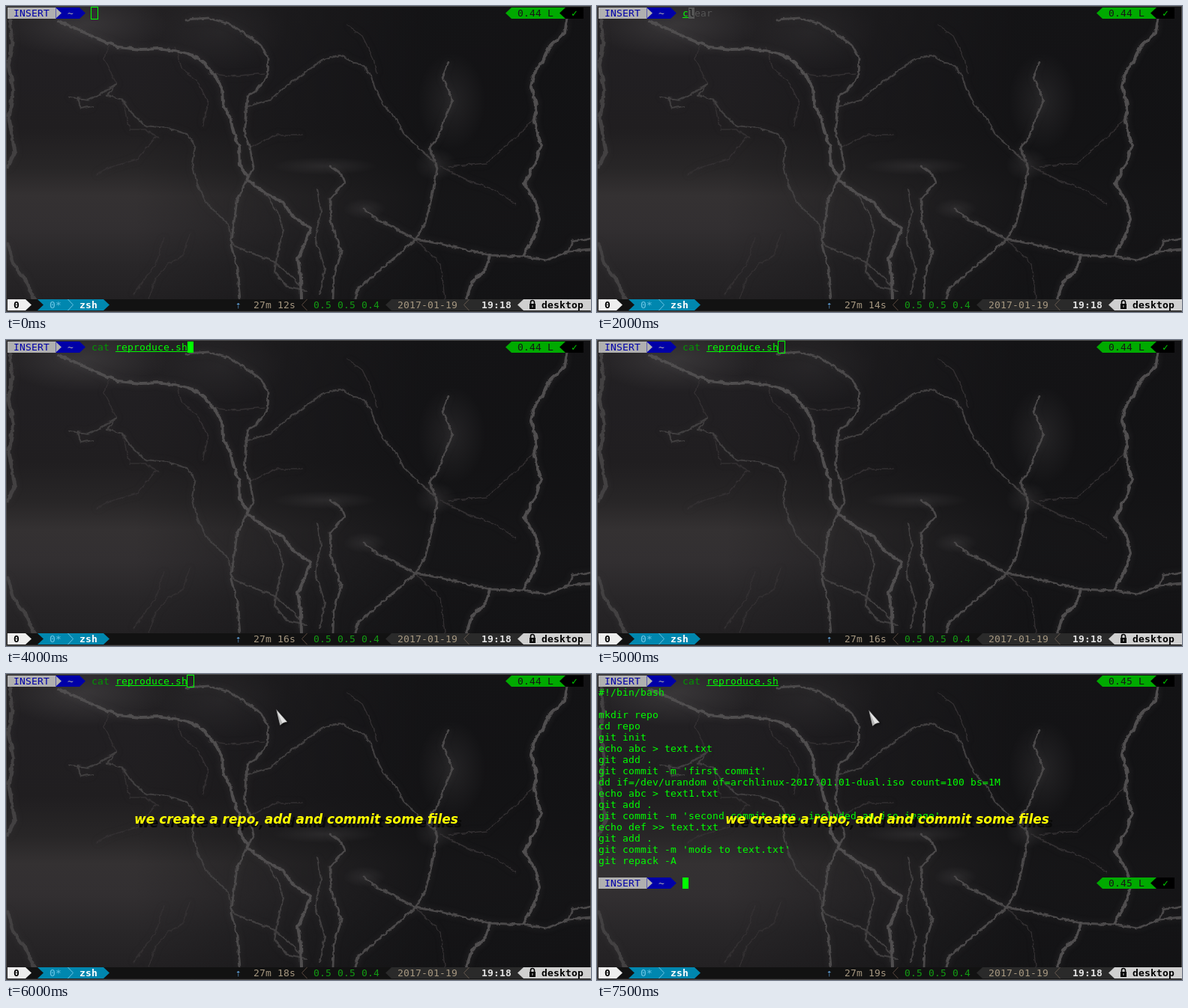
An HTML page for the animation above (8 s loop, 780 by 409 pixels).

```html
<!DOCTYPE html>
<html lang="en">
<head>
<meta charset="utf-8">
<title>Terminal session</title>
<style>
html, body { margin: 0; width: 100%; height: 100%; overflow: hidden; background: #161617; }
svg { display: block; }
/* terminal cells are 8px wide */
text { font: 13px "DejaVu Sans Mono", monospace; letter-spacing: calc(8px - 1ch); white-space: pre; }
.b { font-weight: bold; }
.out, .cur { fill: #00ff00; }
.cmd { fill: #009800; }
.hint { fill: #555; }
.hollow { fill: none; stroke: #00ff00; }
.cap { font: italic bold 17px "DejaVu Sans", sans-serif; letter-spacing: 0; }
.bolts path { fill: none; stroke-linejoin: round; stroke-linecap: round; }

.t, .ptr, .tick { animation: 8s step-end infinite; }
.idle { animation-name: idle; }
.ready { animation-name: ready; }
.clear { animation-name: clear; }
.cat { animation-name: cat; }
.guess { animation-name: guess; }
.file { animation-name: file; }
.block { animation-name: block; }
.blur { animation-name: blur; }
.note { animation-name: note; }
.ptr { animation-name: ptr; }
.before { animation-name: before; }
.after { animation-name: after; }
.tick { animation-name: tick; }
@keyframes idle { 0% { opacity: 1 } 12.5%, 100% { opacity: 0 } }
@keyframes ready { 0% { opacity: 0 } 12.5% { opacity: 1 } 25%, 100% { opacity: 0 } }
@keyframes clear { 0% { opacity: 0 } 25% { opacity: 1 } 31.25%, 100% { opacity: 0 } }
@keyframes cat { 0% { opacity: 0 } 31.25%, 100% { opacity: 1 } }
@keyframes guess { 0% { opacity: 0 } 31.25% { opacity: 1 } 37.5%, 100% { opacity: 0 } }
@keyframes file { 0% { opacity: 0 } 37.5%, 100% { opacity: 1 } }
@keyframes block { 0% { opacity: 0 } 37.5% { opacity: 1 } 62.5% { opacity: 0 } 81.25% { opacity: 1 } 93.75%, 100% { opacity: 0 } }
@keyframes blur { 0% { opacity: 0 } 62.5% { opacity: 1 } 81.25%, 100% { opacity: 0 } }
@keyframes note { 0% { opacity: 0 } 68.75%, 100% { opacity: 1 } }
@keyframes before { 0% { opacity: 1 } 93.75%, 100% { opacity: 0 } }
@keyframes after { 0% { opacity: 0 } 93.75%, 100% { opacity: 1 } }
@keyframes ptr {
  0% { opacity: 0; transform: translate(-2px, -1px) }
  75% { opacity: 1; transform: translate(-2px, -1px) }
  81.25% { opacity: 1; transform: translate(0, -1px) }
  87.5%, 100% { opacity: 1; transform: translate(0, 0) }
}
@keyframes tick {
  0% { transform: translateY(0) }
  12.5% { transform: translateY(-15px) }
  25% { transform: translateY(-30px) }
  50% { transform: translateY(-45px) }
  68.75% { transform: translateY(-60px) }
  75% { transform: translateY(-75px) }
  93.75%, 100% { transform: translateY(-90px) }
}
</style>
</head>
<body>
<svg width="780" height="409" viewBox="0 0 780 409">
  <defs>
    <linearGradient id="sky" x2="0" y2="1">
      <stop offset="0" stop-color="#242224"/>
      <stop offset=".2" stop-color="#211f22"/>
      <stop offset=".4" stop-color="#201e20"/>
      <stop offset=".53" stop-color="#282627"/>
      <stop offset=".62" stop-color="#343132"/>
      <stop offset=".72" stop-color="#322f31"/>
      <stop offset=".85" stop-color="#282628"/>
      <stop offset="1" stop-color="#211f21"/>
    </linearGradient>
    <linearGradient id="dusk">
      <stop offset=".22" stop-color="#111113" stop-opacity="0"/>
      <stop offset=".5" stop-color="#111113" stop-opacity=".5"/>
      <stop offset=".72" stop-color="#111113" stop-opacity=".85"/>
      <stop offset="1" stop-color="#111113" stop-opacity=".9"/>
    </linearGradient>
    <radialGradient id="glow">
      <stop offset="0" stop-color="#777475" stop-opacity=".25"/>
      <stop offset="1" stop-color="#777475" stop-opacity="0"/>
    </radialGradient>
    <filter id="rough" filterUnits="userSpaceOnUse" x="0" y="0" width="780" height="409" color-interpolation-filters="sRGB">
      <feTurbulence type="fractalNoise" baseFrequency=".13" numOctaves="2" seed="4" result="n"/>
      <feDisplacementMap in="SourceGraphic" in2="n" scale="5" xChannelSelector="R" yChannelSelector="G"/>
      <feGaussianBlur stdDeviation=".7" result="line"/>
      <feGaussianBlur stdDeviation="4" result="halo"/>
      <feComponentTransfer in="halo" result="dim"><feFuncA type="linear" slope=".4"/></feComponentTransfer>
      <feMerge><feMergeNode in="dim"/><feMergeNode in="line"/></feMerge>
    </filter>
    <filter id="soft" x="-50%" y="-50%" width="200%" height="200%"><feGaussianBlur stdDeviation="1.5"/></filter>

    <g id="prompt">
      <path fill="#0000a8" d="M66 2h32l8 7.5-8 7.5H66z"/>
      <path fill="#b0b0b0" d="M2 2h64l8 7.5-8 7.5H2z"/>
      <path fill="#5c5cae" d="M66 2h1v15h-1z"/>
      <text x="10" y="14" fill="#0000a8">INSERT</text>
      <text x="82" y="14" fill="#b0b0b0">~</text>
      <path fill="#00aa00" d="M666 9.5l8-7.5h72v15h-72z"/>
      <path fill="#000" d="M738 9.5l8-7.5h24v15h-24z"/>
      <text x="754" y="14" fill="#00d000">✓</text>
    </g>
  </defs>

  <!-- stormy sky -->
  <path fill="url(#sky)" d="M0 0h780v409H0z"/>
  <path fill="url(#dusk)" d="M0 0h780v409H0z"/>
  <g fill="url(#glow)">
    <ellipse cx="105" cy="25" rx="110" ry="45"/>
    <ellipse cx="285" cy="35" rx="90" ry="50" opacity=".4"/>
    <ellipse cx="594" cy="127" rx="45" ry="65" opacity=".7"/>
    <ellipse cx="573" cy="212" rx="28" ry="22" opacity=".7"/>
    <ellipse cx="425" cy="214" rx="70" ry="12" opacity=".7"/>
    <ellipse cx="478" cy="271" rx="28" ry="14" opacity=".7"/>
  </g>
  <g class="bolts" filter="url(#rough)">
    <g stroke="#333032" stroke-width="1.5">
      <path d="M140 48L130 70 147 103M225 55L235 85 255 100 270 130 262 160M455 25L475 40 490 70 494 90"/>
      <path d="M245 305L235 335 215 345 200 365 190 392M210 310L200 345 170 385M200 175L175 205 140 215 120 225"/>
      <path d="M270 90L300 94 345 90M580 215L620 235 650 245 680 265M590 215L640 210 680 175 705 150"/>
      <path d="M155 126L165 165 185 165 203 175M546 312L580 345 585 392M325 190L360 172 395 172"/>
    </g>
    <g stroke="#413f40" stroke-width="2.2">
      <path d="M320 135L355 124 375 105 395 92 420 73 445 66 475 80 485 90 492 110 505 135 520 150 530 170 550 190 575 212"/>
      <path d="M85 122L110 125 130 115 147 103 135 120 155 125 167 142 185 160 215 163 243 172 252 190 248 210 255 238 268 264 296 292 303 320"/>
      <path d="M345 250L362 275 370 300 362 330 358 355 375 375 400 380M303 320L340 335 358 342 385 365 395 380"/>
      <path d="M95 122L100 137 115 134M415 245L420 275 412 310 425 350 418 385"/>
    </g>
    <g stroke="#4b494a" stroke-width="2.8">
      <path d="M240 18L270 16 300 25 322 40 340 52 350 70 349 92 335 112 322 122 320 150 318 172 325 190 330 215 318 240 308 260 304 290 300 320 308 350 312 392"/>
      <path d="M590 75L582 96 596 126 585 150 576 175 565 190 575 217 568 254 559 290 546 312 525 330 505 348 485 365 470 376 465 392"/>
      <path d="M477 271L495 285 515 295 546 312 580 318 610 325 645 333 690 335 720 340 750 328 780 325M780 310L755 315 750 328"/>
      <path d="M432 214L447 225 451 236 432 258 433 288 442 314 447 330 437 362 436 392"/>
    </g>
    <g stroke="#504e4f" stroke-width="4">
      <path d="M70 20L100 33 120 43 150 55 180 58 205 57 230 61 250 66 264 76 278 92 288 110 289 130 298 148 304 170 311 188 312 212 324 234 347 251 370 263 381 280 406 297 399 316 389 338 393 362 394 392"/>
      <path d="M748 18L745 36 724 55 715 75 704 90 700 108 707 132 705 155 713 185 707 207 691 237 706 262 712 285 704 308 690 333"/>
      <path d="M645 333L640 352 621 369 614 392"/>
    </g>
    <path stroke="#434142" stroke-width="5" d="M5 18L8 50 3 80 10 110 4 150 12 195 2 215M2 318L10 345 25 365 38 392"/>
  </g>

  <!-- prompt line -->
  <use href="#prompt"/>
  <text class="t before" x="682" y="14" fill="#161616">0.44 L</text>
  <text class="t after" x="682" y="14" fill="#161616">0.45 L</text>

  <rect class="t idle hollow" x="113.5" y="1.5" width="9" height="16"/>
  <rect class="t ready cur" x="114" y="2" width="8" height="15"/>

  <g class="t clear">
    <text class="out" x="114" y="14">c</text>
    <path class="out" d="M114 15h8v1h-8z"/>
    <path class="hint" d="M122 2h8v15h-8z"/>
    <text x="122" y="14" fill="#161617">l</text>
    <text class="hint" x="130" y="14">ear</text>
  </g>

  <text class="t cat cmd" x="114" y="14">cat</text>
  <g class="t guess">
    <path class="hint" d="M146 2h8v15h-8z"/>
    <text x="146" y="14" fill="#161617">r</text>
    <text class="hint" x="154" y="14">eproduce.sh</text>
  </g>
  <g class="t file out">
    <text x="146" y="14">reproduce.sh</text>
    <path d="M146 15h96v1h-96z"/>
  </g>
  <rect class="t block cur" x="242" y="2" width="8" height="15"/>
  <rect class="t blur hollow" x="241.5" y="1.5" width="9" height="16"/>

  <!-- command output -->
  <g class="t after">
    <g class="out">
      <text x="2" y="29">#!/bin/bash</text>
      <text x="2" y="59">mkdir repo</text>
      <text x="2" y="74">cd repo</text>
      <text x="2" y="89">git init</text>
      <text x="2" y="104">echo abc &gt; text.txt</text>
      <text x="2" y="119">git add .</text>
      <text x="2" y="134">git commit -m 'first commit'</text>
      <text x="2" y="149">dd if=/dev/urandom of=archlinux-2017.01.01-dual.iso count=100 bs=1M</text>
      <text x="2" y="164">echo abc &gt; text1.txt</text>
      <text x="2" y="179">git add .</text>
      <text x="2" y="194">git commit -m 'second commit, ups, included an iso image'</text>
      <text x="2" y="209">echo def &gt;&gt; text.txt</text>
      <text x="2" y="224">git add .</text>
      <text x="2" y="239">git commit -m 'mods to text.txt'</text>
      <text x="2" y="254">git repack -A</text>
    </g>
    <use href="#prompt" y="270"/>
    <text x="682" y="284" fill="#161616">0.45 L</text>
    <rect class="cur" x="114" y="272" width="8" height="15"/>
  </g>

  <rect x=".5" y=".5" width="779" height="408" fill="none" stroke="#4c4c4c"/>

  <!-- status bar -->
  <path fill="#121212" d="M2 392h776v15H2z"/>
  <path fill="#0087af" d="M42 392h88l8 7.5-8 7.5H42z"/>
  <path fill="#121212" d="M34 392h8l8 7.5-8 7.5h-8z"/>
  <path fill="#eee" d="M2 392h24l8 7.5-8 7.5H2z"/>
  <text class="b" x="10" y="404" fill="#000">0</text>
  <text x="58" y="404" fill="#6cc5e4">0*</text>
  <path fill="none" stroke="#6cc5e4" d="M82.5 392l7 7.5-7 7.5"/>
  <text class="b" x="98" y="404" fill="#fff">zsh</text>

  <text x="306" y="404" fill="#5f9fd7">⇡</text>
  <g fill="#a59780">
    <text x="330" y="404">27m 1</text>
    <svg x="370" y="392" width="8" height="15">
      <g class="tick">
        <text y="12">2</text>
        <text y="27">3</text>
        <text y="42">4</text>
        <text y="57">6</text>
        <text y="72">7</text>
        <text y="87">8</text>
        <text y="102">9</text>
      </g>
    </svg>
    <text x="378" y="404">s</text>
  </g>
  <path fill="none" stroke="#5c4a40" d="M401.5 392l-7 7.5 7 7.5"/>
  <text x="410" y="404" fill="#129a12">0.5 0.5 0.4</text>
  <path fill="#2a2a2a" d="M506 399.5l8-7.5h176v15H514z"/>
  <text x="522" y="404" fill="#a59780">2017-01-19</text>
  <path fill="none" stroke="#66594f" d="M617.5 392l-7 7.5 7 7.5"/>
  <text class="b" x="634" y="404" fill="#e4e4e4">19:18</text>
  <path fill="#d0d0d0" d="M682 399.5l8-7.5h90v15h-90z"/>
  <path fill="#000" d="M698 398h8v7h-8z"/>
  <path fill="none" stroke="#000" stroke-width="1.6" d="M699.5 398v-2a2.5 2.5 0 0 1 5 0v2"/>
  <path fill="#d0d0d0" d="M701.5 400h1v3h-1z"/>
  <text class="b" x="714" y="404" fill="#000">desktop</text>

  <!-- caption and pointer -->
  <g class="t note">
    <text class="cap" x="176" y="205" fill="#080808">we create a repo, add and commit some files</text>
    <text class="cap" x="171" y="200" fill="#ffff00">we create a repo, add and commit some files</text>
  </g>
  <g class="ptr">
    <path fill="#000" opacity=".6" filter="url(#soft)" d="M364 51L379 66Q373 67 370 71z"/>
    <path fill="#e4e4e4" stroke="#555" stroke-width=".6" d="M362.5 48.5L377 65Q371 65.5 367.5 69.5z"/>
    <path fill="#b4b4b4" d="M363 50L370.5 66.5 367.5 69z"/>
  </g>
</svg>
</body>
</html>
```
